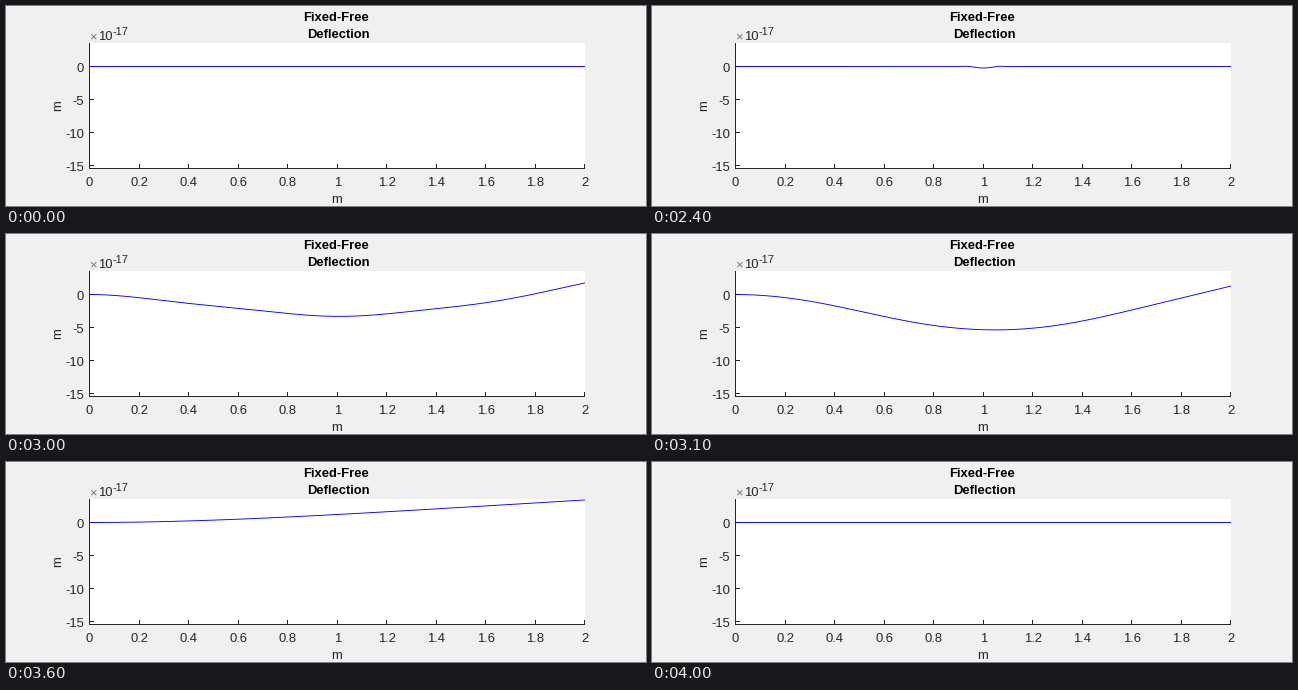
A matplotlib script for the animation above (5.1 s loop, 640x200 px).

```python
import numpy as np
import matplotlib.pyplot as plt
from matplotlib.animation import FuncAnimation
from matplotlib.patches import Rectangle

W, H, DPI = 640, 200, 100
PX = 72 / DPI                     # one pixel in points
FRAMES, STEP = 51, 100
LEFT, RIGHT, TOP, BOTTOM = 83.5, 579, 37, 162.5
ZERO, UNIT = 60.5, 6.61           # pixel row of zero, pixels per 1e-17 m
INK, BLUE = "#262626", "#0000ff"
START, STOP = 16, 40              # the beam is visibly moving in between

plt.rcParams["font.family"] = "Liberation Sans"

# Cantilever modes, in a form that stays finite for high orders
beta = (2 * np.arange(1, 301) - 1) * np.pi / 2
beta[:3] = 1.8751041, 4.6940911, 7.8547574
omega = (beta / beta[0]) ** 2


def shapes(s):
    b, s = beta[:, None], np.atleast_1d(s)[None, :]
    e = np.exp(-b)
    den = 1 - e**2 + 2 * np.sin(b) * e
    rest = 2 * e * (np.sin(b) - np.cos(b) - e) / den
    grow = np.exp(b * (s - 1)) * (np.sin(b) - np.cos(b) - e) / den
    decay = np.exp(-b * s) * (1 - rest / 2)
    return grow + decay - np.cos(b * s) + (1 - rest) * np.sin(b * s)


s = np.linspace(0, 1, 801)
modes = shapes(s)
gain = -15.75 * shapes(0.5)[:, 0] / omega
damping = 0.24 + np.minimum(0.022 * omega, 0.14) * omega

# Phase of the first mode; grows roughly geometrically
KEYS = [16, 21, 24, 27, 28, 31, 32, 33, 34, 35, 36, 40]
PHASES = [1.4e-5, 8e-5, 4.4e-4, 0.0075, 0.0213, 0.195, 0.32, 0.46, 0.8, 1.4, 3.566, 30]


def deflection(n):
    if not START <= n < STOP:
        return np.zeros_like(s)
    t = np.exp(np.interp(n, KEYS, np.log(PHASES)))
    return (gain * np.sin(omega * t) * np.exp(-damping * t)) @ modes


fig = plt.figure(figsize=(W / DPI, H / DPI), dpi=DPI, facecolor="#f0f0f0")
ax = fig.add_axes([0, 0, 1, 1])
ax.set(xlim=(0, W), ylim=(H, 0))
ax.axis("off")


def label(x, y, text, size=13, ha="center", **kw):
    kw.setdefault("color", INK)
    ax.text(x, y, text, fontsize=size * PX, ha=ha, va="baseline", **kw)


def stroke(xs, ys):
    ax.plot(xs, ys, color=INK, lw=PX, solid_capstyle="butt", snap=False, zorder=2)


def pixel(v):
    return np.floor(v) + 0.5


area = Rectangle((83, TOP), RIGHT - 83, 163 - TOP, fc="white", ec="none", zorder=0)
ax.add_patch(area)
stroke([LEFT - 0.5, RIGHT], [BOTTOM, BOTTOM])
stroke([LEFT, LEFT], [TOP, BOTTOM + 0.5])

for i in range(11):
    x = LEFT + (RIGHT - LEFT) * i / 10
    tick = min(pixel(x), RIGHT - 0.5)
    stroke([tick, tick], [BOTTOM, BOTTOM - 4.5])
    label(x, 180, f"{i / 5:g}")
for v in (0, -5, -10, -15):
    y = ZERO - v * UNIT
    stroke([LEFT, LEFT + 4.5], [pixel(y), pixel(y)])
    label(78, y + 5, str(v), ha="right")

label(330.5, 15, "Fixed-Free", weight="bold", color="black")
label(332, 32, "Deflection", weight="bold", color="black")
label(331, 197, "m")
ax.text(52.5, 100, "m", fontsize=13 * PX, color=INK, rotation=90, ha="center", va="center")
label(83.5, 34, "×", ha="left", color="#777777")
label(92, 34, "10", ha="left")
label(107, 29, "-17", size=11, ha="left")

beam, = ax.plot([], [], color=BLUE, lw=0.9 * PX, snap=False, zorder=3)
beam.set_clip_path(Rectangle((LEFT, TOP - 0.5), RIGHT - LEFT, BOTTOM - TOP + 1,
                             transform=ax.transData))


def draw(n):
    beam.set_data(LEFT + (RIGHT - LEFT) * s, ZERO - UNIT * deflection(n))
    return beam,


anim = FuncAnimation(fig, draw, frames=FRAMES, init_func=lambda: draw(0),
                     interval=STEP, repeat=True, repeat_delay=0)
plt.show()
```
